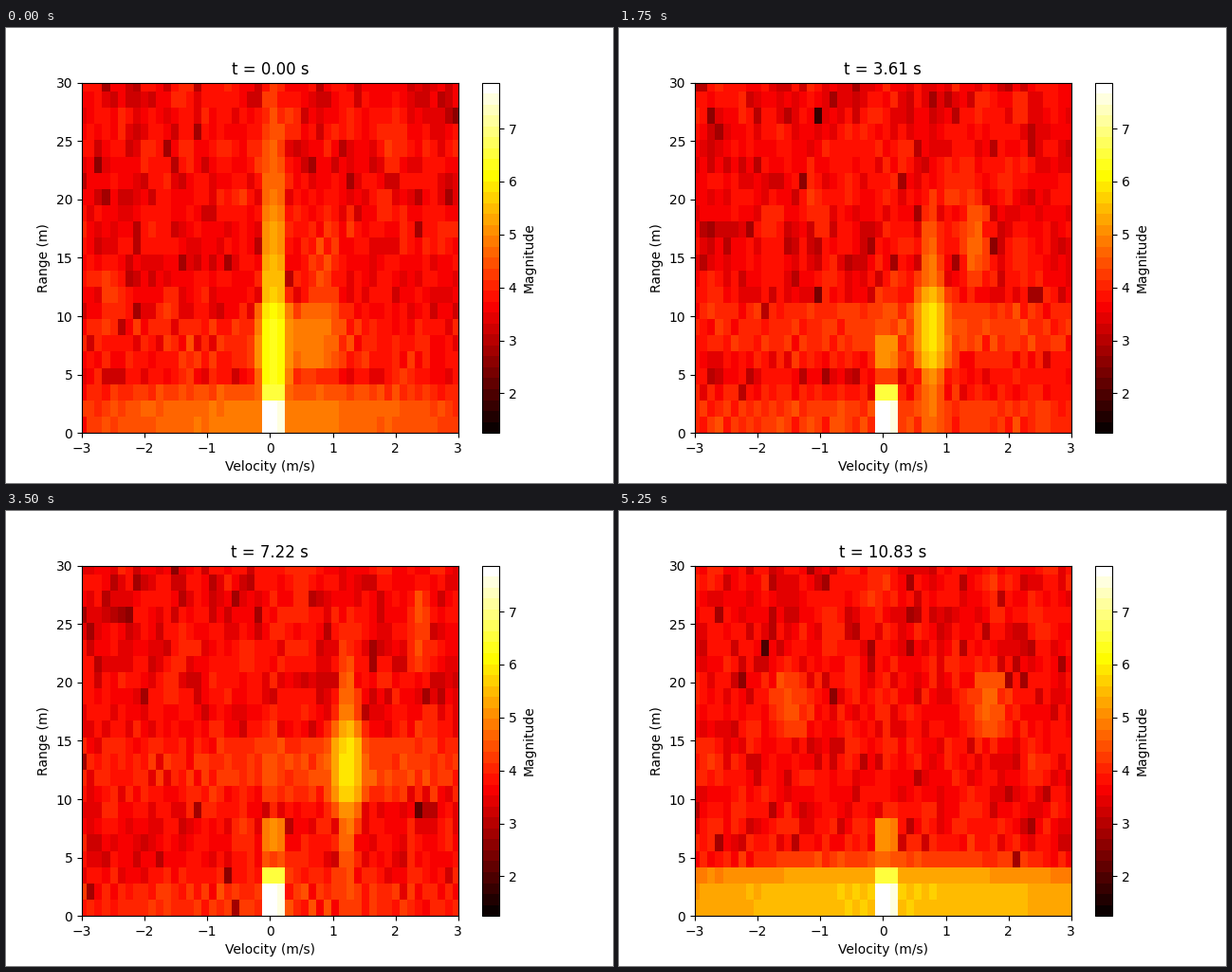
A matplotlib script that plays this animation: 640x480 px, repeating every 5.5 s.

```python
import numpy as np
import matplotlib.pyplot as plt
from matplotlib.animation import FuncAnimation

FRAMES, INTERVAL = 22, 250
TIME_STEP = 0.5158
ROWS, COLS = 22, 50
ROW_SIZE, COL_SIZE = 1.3922, 0.1216
V_MIN, V_MAX = 1.254, 7.866

row = np.arange(ROWS)[:, None]
col = np.arange(-COLS // 2, COLS // 2)[None, :]

# Scene parameters over time, all magnitudes in log10 units
KEY_TIMES = [0, 1.03, 2.58, 5.16, 7.22, 8.77, 10.83]
TRACKS = {
    "row": [5, 4.5, 5, 7, 8.7, 10.5, 12.6],
    "col": [0, 3, 4, 8.4, 9.6, 11.7, 13.3],
    "peak": [5.9, 5.75, 5.8, 5.85, 5.85, 5.8, 4.5],
    "smear": [4.1, 4.65, 4.25, 4.65, 4.4, 4.4, 3.5],
    "floor": [4.85, 4.55, 4.25, 4.15, 4.1, 5.28, 5.6],
    "bend": [0.7, 0.1, 0.1, 0.2, 0.3, 0.05, 0.4],
    "rough": [0.1, 0.25, 0.3, 0.4, 0.4, 0.03, 0.08],
    "harmonic": [4.0, 4.85, 4.7, 4.6, 4.4, 4.2, 0],
    "mirror": [0, 0, 0, 0, 0, 3.5, 4.4],
}


def blob(level, r0, c0, height, width):
    """Spot with a flat range profile and a rounded velocity profile."""
    return 10 ** (level - ((row - r0) / height) ** 4 - ((col - c0) / width) ** 2)


def complex_noise(rng):
    """Unit-power noise, correlated between neighbours like a windowed FFT."""
    z = rng.normal(size=(ROWS, COLS)) + 1j * rng.normal(size=(ROWS, COLS))
    for axis in (0, 1):
        z = z - 0.4 * (np.roll(z, 1, axis) + np.roll(z, -1, axis))
    return z / (np.sqrt(2) * 1.32)


def static_return():
    """Stationary reflections, confined to the three central velocity bins."""
    profile = np.full(ROWS, 3.8)
    profile[:6] = 7.8, 7.8, 6.6, 4.4, 5.1, 5.1
    shape = np.where(np.abs(col) <= 1, -0.13 * np.abs(col) - 0.04 * (col == 1), -9.0)
    return 10 ** (profile[:, None] + shape)


def magnitude(index):
    t = index * TIME_STEP
    p = {name: np.interp(t, KEY_TIMES, keys) for name, keys in TRACKS.items()}
    rng = np.random.default_rng(100 + index)
    noise, smear_noise, floor_noise = (complex_noise(rng) for _ in range(3))
    r, c = p["row"], p["col"]
    late = max(0, (t - 8.77) / 2.06)
    early = max(0, 1 - t / 1.03)

    total = 10 ** 3.77 * noise + static_return()

    # Walker, its range sidelobes, harmonic and mirror image
    total += blob(p["peak"], r, c, 2.6, 2 + 1.3 * late)
    total += 10 ** (p["peak"] - 0.75 - ((row - r) / 8) ** 2 - ((col - c) / 1.6) ** 2)
    total += blob(p["harmonic"], 1.95 * r, 2 * c, 3.2, 2)
    total += blob(p["mirror"], 12.6, -12.5, 2.6, 3.5)

    smear = p["smear"] - ((row - r) / 2.3) ** 4 - 0.018 * np.abs(col - c)
    total += 10 ** smear * (1 + 0.35 * smear_noise)

    # Strong return before the walker starts to move away
    if early:
        trail = np.where(row >= 3, 6.25 - 0.13 * (row - 3), 0)
        total += early * 10 ** (trail - 0.2 * (col / 1.1) ** 4)
        total += early * blob(4.85, 5.2, 5, 2.4, 4.5)
        total += early * blob(4.35, 9, 6.5, 4, 3)

    # Close-range clutter across all velocities
    floor = p["floor"] - (np.abs(row - 0.5) / 1.8) ** 6 - p["bend"] * (col / 25) ** 2
    total += 10 ** floor * (1 + p["rough"] * floor_noise)
    total += late * 10 ** (4.35 - np.abs(row - 3) * 0.5 - (col / 30) ** 2)

    return np.log10(np.abs(total))


fig, ax = plt.subplots(figsize=(6.4, 4.8), dpi=100)
velocity_edges = np.arange(-COLS // 2, COLS // 2 + 1) * COL_SIZE
range_edges = np.arange(ROWS + 1) * ROW_SIZE
mesh = ax.pcolormesh(velocity_edges, range_edges, magnitude(0),
                     cmap=plt.get_cmap("hot", 32), vmin=V_MIN, vmax=V_MAX)
ax.set(xlim=(-3, 3), ylim=(0, 30), xlabel="Velocity (m/s)", ylabel="Range (m)")
title = ax.set_title("t = 0.00 s")
fig.colorbar(mesh, ax=ax, label="Magnitude")


def update(index):
    mesh.set_array(magnitude(index))
    title.set_text(f"t = {index * TIME_STEP:.2f} s")
    return mesh, title


animation = FuncAnimation(fig, update, frames=FRAMES, interval=INTERVAL,
                          init_func=lambda: update(0), repeat=True, repeat_delay=0)
plt.show()
```
